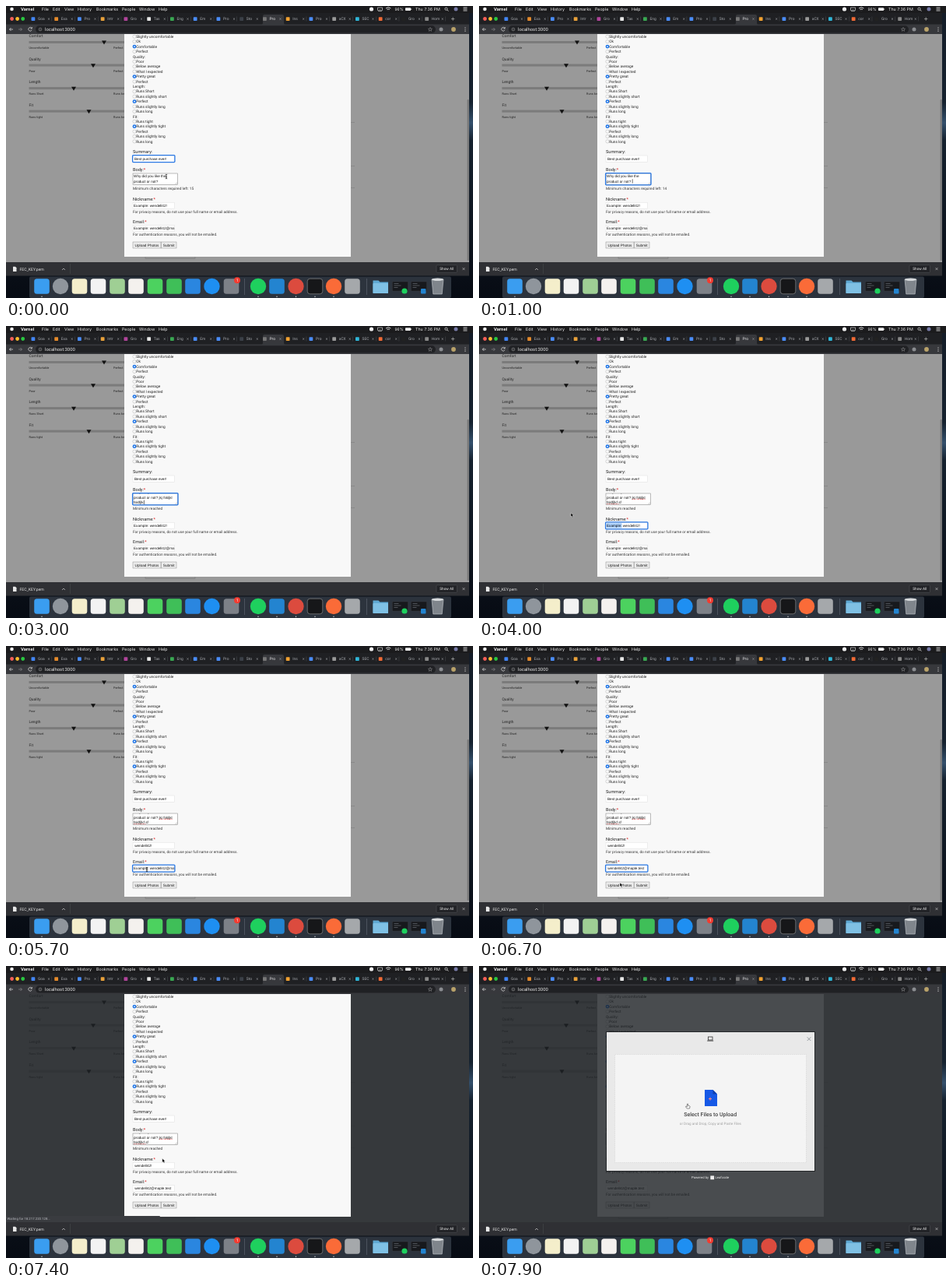
An HTML page for the animation above (8 s loop, 600 by 375 pixels).

```html
<!DOCTYPE html>
<html lang="en">
<head>
<meta charset="utf-8">
<title>Review form</title>
<style>
  html, body { margin: 0; width: 100%; height: 100%; overflow: hidden; background: #0b111b; }
  svg { display: block; width: 600px; height: 375px; }
  text { white-space: pre; text-rendering: geometricPrecision; }
  .ui { font-family: Inter, "Open Sans", sans-serif; }
  .page { font-family: Roboto, sans-serif; }
  .field { font-family: "Liberation Sans", Arial, sans-serif; }
</style>
</head>
<body>
<svg id="stage" viewBox="0 0 600 375" xmlns="http://www.w3.org/2000/svg"></svg>
<script>
const LOOP = 8000, STEP = 100;
const TOP = 36, BOTTOM = 329;  // visible part of the web page
const SHADE = 'rgb(30,34,38)';

// ---- markup helpers; text is placed by its vertical middle ----
const rect = (x, y, w, h, fill, more = '') =>
  `<rect x="${x}" y="${y}" width="${w}" height="${h}" fill="${fill}" ${more}/>`;
const disc = (x, y, r, fill, more = '') =>
  `<circle cx="${x}" cy="${y}" r="${r}" fill="${fill}" ${more}/>`;
const path = (d, stroke, width = .6, more = 'fill="none"') =>
  `<path d="${d}" stroke="${stroke}" stroke-width="${width}" ${more}/>`;
const label = (x, y, size, str, fill = '#222', font = 'page', more = '') =>
  `<text class="${font}" x="${x}" y="${(y + size * .35).toFixed(2)}" font-size="${size}" fill="${fill}" ${more}>${str}</text>`;
const group = (id, body, more = '') => `<g id="${id}" ${more}>${body}</g>`;
const cross = (x, y, r, color, width = .6) =>
  path(`M${x - r} ${y - r}l${2 * r} ${2 * r}m0 ${-2 * r}l${-2 * r} ${2 * r}`, color, width);

function menuBar() {
  const items = [[46, 'File'], [60, 'Edit'], [75, 'View'], [92, 'History'], [116, 'Bookmarks'],
    [149, 'People'], [171, 'Window'], [196, 'Help']];
  return rect(0, 0, 600, 9, '#1b1b1d') + disc(7.5, 4, 2.3, '#eee')
    + label(19, 4, 5.4, 'Varnel', '#fff', 'ui', 'font-weight="700"')
    + items.map(([x, s]) => label(x, 4, 5.3, s, '#f2f2f2', 'ui')).join('')
    + disc(469.5, 4, 2.6, '#f2f2f2')
    + path('M478.500 5.500h-1V2h6v3.500h-1M478.500 6.600l2-2 2 2z', '#eee', .6)
    + path('M488 3q3.200-2.700 6.400 0M489.500 4.600q1.700-1.400 3.400 0M491.200 6.200v.1', '#eee', .9)
    + label(499.5, 4, 5, '96%', '#f2f2f2', 'ui')
    + rect(513, 2.2, 7, 3.8, '#eee', 'rx=".7"') + rect(520.4, 3.2, .7, 1.8, '#eee')
    + label(526, 4, 5.3, 'Thu 7:36 PM', '#f2f2f2', 'ui')
    + disc(565.5, 3.7, 1.6, 'none', 'stroke="#eee" stroke-width=".7"') + path('M566.700 4.900l1.700 1.700', '#eee', .8)
    + disc(578, 4, 2.5, '#777ba8')
    + path('M587.500 2h5M587.500 4h5M587.500 6h5', '#eee', .8);
}

function tabs() {
  const names = 'Goa Exa Pro Intr Gro Tas Eng Em Pro Sto Pro Ins Pro aCX SEC cor Gro Hom'.split(' ');
  const icons = '#4285f4 #e58a2c #4a8cf7 #e7a03a #b0449a #e6e6e6 #39a852 #4a8cf7 #4a8cf7 #3b4048 #777 #f0a030 #4a8cf7 #999 #2fb6d8 #f06a35 #222 #888'.split(' ');
  let s = rect(0, 9, 595, 15, '#1f2023')
    + disc(7.6, 16.5, 2.4, '#f95f57') + disc(14.6, 16.5, 2.4, '#fbbd2e') + disc(21.7, 16.5, 2.4, '#2ac840')
    + path('M328 24q2 0 2-3V13q0-2 2-2h23q2 0 2 2v8q0 3 2 3z', 'none', 0, 'fill="#37383c"');
  names.forEach((name, i) => {
    const x = 41 + i * 29.75;
    s += rect(x - 8.5, 14.2, 4.8, 4.8, icons[i], 'rx=".8"')
      + label(x, 16.6, 4.9, name, i === 10 ? '#eee' : '#a9abb0')
      + cross(x + 14, 16.6, 1.1, '#b4b6ba', .5);
    if (i < 9 || i > 10) s += rect(x + 17.5, 13.5, .4, 6, '#55575b');
  });
  return s + path('M572 16.600h4.400M574.200 14.400v4.400', '#ccc', .6);
}

function toolbar() {
  return rect(0, 23.5, 595, TOP - 23.5, '#37383c')
    + path('M9 30H4.500m2-2l-2 2 2 2', '#e4e4e4', .7)
    + path('M16 30h4.500m-2-2l2 2-2 2', '#88898c', .7)
    + path('M33 28.500a2.300 2.300 0 1 0 .2 2.200M33.300 27v2h-2', '#e4e4e4', .7)
    + rect(38, 25.3, 514, 9.2, '#202124', 'rx="4.600"')
    + disc(44, 30, 1.9, 'none', 'stroke="#aaa" stroke-width=".5"') + path('M44 29.700v1.300M44 28.700v.4', '#aaa', .5)
    + label(50, 29.9, 5.9, 'localhost:3000', '#e8e8e8')
    + path('M545 27.500l.7 1.700 1.800.1-1.400 1.200.5 1.800-1.600-1-1.600 1 .5-1.800-1.400-1.200 1.800-.1z', '#bbb', .4)
    + disc(559, 30, 2.5, '#8b8d91') + disc(575, 30, 2.9, '#b9a26a')
    + [27.8, 30, 32.2].map(y => disc(590, y, .6, '#ddd')).join('');
}

function backPage() {
  const rows = [['Comfort', 'Uncomfortable', 'Perfect', 126], ['Quality', 'Poor', 'Perfect', 112],
    ['Length', 'Runs Short', 'Runs long', 87], ['Fit', 'Runs tight', 'Runs long', 106.5]];
  let s = rect(0, TOP, 595, BOTTOM - TOP, '#999');
  rows.forEach(([title, low, high, x], i) => {
    const y = 46.4 + i * 29.55;
    s += label(29.5, y - 8, 4.9, title) + rect(29.5, y - 1.4, 124, 3, '#7b7b7b')
      + path(`M${x - 3} ${y - 1.8}h6l-3 5z`, 'none', 0, 'fill="#111"')
      + label(29.5, y + 7.6, 3.9, low) + label(138, y + 7.6, 3.9, high);
  });
  return s + [149, 205.5, 233].map(y => rect(442, y, 6, .5, '#777')).join('')
    + rect(179, 315, 64, 9.7, '#949494', 'stroke="#777" stroke-width=".5"');
}

function options() {
  const rows = ['Slightly uncomfortable', 'Ok', '*Comfortable', 'Perfect',
    'Quality:', 'Poor', 'Below average', 'What I expected', '*Pretty great', 'Perfect',
    'Length:', 'Runs Short', 'Runs slightly short', '*Perfect', 'Runs slightly long', 'Runs long',
    'Fit:', 'Runs tight', '*Runs slightly tight', 'Perfect', 'Runs slightly long', 'Runs long'];
  return rows.map((row, i) => {
    const y = 39.3 + i * 6.41;
    if (row.endsWith(':')) return label(163, y, 4.8, row);
    const on = row[0] === '*';
    const dot = on ? disc(165, y, 2.4, '#1a73e8') + disc(165, y, .9, '#fff')
      : disc(165, y, 2.1, '#fff', 'stroke="#999" stroke-width=".4"');
    return dot + label(167.2, y, 4.8, on ? row.slice(1) : row);
  }).join('');
}

const star = '<tspan fill="#e02020">*</tspan>';
const heading = (y, s) => label(163, y, 5.6, s);
const input = (y, id, x, str) => rect(163, y, 53.5, 8.3, '#fff', 'stroke="#ddd" stroke-width=".5"')
  + `<svg x="163" y="${y}" width="53.500" height="8.300" viewBox="163 ${y} 53.500 8.300">`
  + rect(164, y + 1, 0, 6.3, '#a9cffb', `id="${id}Sel"`)
  + label(x, y + 4.2, 4.65, str, '#111', 'field', `id="${id}"`) + '</svg>';
const ring = (id, y, w, h) => rect(162.6, y - .4, w, h, 'none', `id="${id}" rx="1" stroke="#2a78e4" stroke-width="1.300"`);
const button = (x, w, s) => rect(x, 303, w, 8, '#ededed', 'stroke="#777" stroke-width=".4"')
  + label(x + w / 2, 307, 4.7, s, '#111', 'field', 'text-anchor="middle"');
const wave = (x, y, w) => path(`M${x} ${y}h${w}`, '#e03030', .8, 'stroke-dasharray=".9 .6"');
const panel = (fill, more) => rect(152, TOP, 291, 322 - TOP, fill, more);

function form() {
  return panel('#f8f8f8') + options()
    + heading(187.5, 'Summary:') + input(192, 'summary', 165, 'Best purchase ever!')
    + heading(210.5, 'Body:' + star)
    + rect(163, 215, 57.6, 14.4, '#fff', 'stroke="#777" stroke-width=".5"')
    + '<svg x="163" y="215.200" width="57.600" height="14" viewBox="163 215.200 57.600 14">'
    + group('lines', label(164, 218.6, 4.65, 'Why did you like the', '#111', 'field')
      + label(164, 225, 4.65, '', '#111', 'field', 'id="line2"')
      + label(164, 231.4, 4.65, '', '#111', 'field', 'id="line3"')
      + group('waves', wave(197, 227.4, 4.5) + wave(202.5, 227.4, 11) + wave(164, 233.8, 15.5)))
    + '</svg>' + path('M217.500 228.800l2.400-2.400M219 228.800l.9-.9', '#777', .4)
    + label(163, 234.5, 4.78, '', '#333', 'page', 'id="hint"')
    + heading(248, 'Nickname:' + star) + input(252.2, 'nick', 164, '')
    + label(163, 264, 4.78, 'For privacy reasons, do not use your full name or email address.', '#333')
    + heading(277.5, 'Email:' + star) + input(281.5, 'mail', 164, '')
    + label(163, 293.2, 4.78, 'For authentication reasons, you will not be emailed.', '#333')
    + button(163, 36, 'Upload Photos') + button(199.3, 19.7, 'Submit')
    + ring('ringSummary', 192, 54.3, 9) + ring('ringBody', 215, 58.4, 15.2)
    + ring('ringNick', 252.2, 54.3, 9) + ring('ringMail', 281.5, 54.3, 9)
    + rect(0, 0, .6, 5.4, '#111', 'id="caret"');
}

function picker() {
  return rect(163, 84, 269, 180, '#15181b', 'opacity=".7"')
    + rect(164, 85, 267, 178, '#e9e9e9')
    + rect(294.4, 91, 5.6, 4, 'none', 'stroke="#333" stroke-width=".8"') + rect(293.2, 95.6, 8, .9, '#333')
    + cross(424, 93.7, 2.3, '#8d9399', .9)
    + rect(174.5, 113.5, 246, 139, '#f4f4f4', 'stroke="#ccc" stroke-width=".5" stroke-dasharray="1.500 1"')
    + path('M290 159h10.500l5.500 5.500V180h-16z', 'none', 0, 'fill="#1759e6"')
    + path('M300.500 159v5.500h5.500z', 'none', 0, 'fill="#0d3fae"')
    + path('M295 170.600h4M297 168.600v4', '#ff8a80', 1)
    + label(297.2, 190.8, 7, 'Select Files to Upload', '#444', 'page', 'text-anchor="middle" font-weight="500"')
    + label(297.4, 202.7, 4.6, 'or Drag and Drop, Copy and Paste Files', '#a0a0a0', 'page', 'text-anchor="middle"')
    + label(273, 272, 4.25, 'Powered by', '#f0f0f0') + rect(297.3, 269.4, 4.8, 4.8, '#eee')
    + label(303.5, 272, 4.25, 'Leafcrate', '#f0f0f0');
}

function downloads() {
  return rect(0, BOTTOM, 595, 17.5, '#2f3034')
    + path('M9 334.700h3l1.500 1.500v4.800H9z', 'none', 0, 'fill="#e8e8e8"')
    + label(17.5, 338, 5.1, 'FEC_KEY.pem', '#e6e6e6')
    + path('M72 339l2-2 2 2', '#ccc', .7) + rect(82, 331, .4, 13, '#55565a')
    + rect(553, 332.8, 26.5, 9.6, '#222327', 'rx="1" stroke="#55565a" stroke-width=".5"')
    + label(566.3, 337.6, 4.7, 'Show All', '#f0f0f0', 'page', 'text-anchor="middle"')
    + cross(588, 337.6, 1.5, '#ccc', .6);
}

function dock() {
  const apps = [[46, '#3a9df0'], [70, '#8f959c', 1], [94.5, '#f4eecb'], [118.5, '#f3f3f3'], [143, '#9fcf94'],
    [167, '#f4f1ee'], [191.5, '#4cd25f'], [216, '#3fbf58'], [240, '#2a86e0'], [264.5, '#1e8ff2', 1], [289.5, '#7d8188'],
    [324, '#1ed05e', 1], [348, '#2384d0'], [372.5, '#dc4b3e', 1], [397, '#161719'], [421, '#fa6b38', 1], [445, '#a5a8ab']];
  const thumb = x => rect(x - 10, 354, 20, 12, '#17191d', 'stroke="#444" stroke-width=".3"')
    + path(`M${x - 8} 356.500h6m-6 2.500h9m-9 2.500h5`, '#777b82', .6);
  return rect(30, 347.5, 542, 27.5, '#2c333d', 'rx="2"')
    + apps.map(([x, c, round]) => round ? disc(x, 360, 10.2, c)
      : rect(x - 9.8, 350.2, 19.6, 19.6, c, 'rx="3.500"' + (x === 397 ? ' stroke="#999" stroke-width=".6"' : ''))).join('')
    + disc(297, 352.3, 4, '#f33b30') + label(297, 352.3, 5, '1', '#fff', 'ui', 'text-anchor="middle"')
    + [306.5, 463].map(x => rect(x, 350, .5, 21, '#6c7480')).join('')
    + path('M471.500 352.500h7l2 2h10.500v14.500h-19.500z', 'none', 0, 'fill="#5fa9d3"') + rect(471.5, 356, 19.5, 13, '#7fc0e4', 'rx="1"')
    + thumb(506.5) + disc(512, 366, 3.6, '#1ed05e') + thumb(530.5) + rect(533, 363, 6.5, 6.5, '#2384d0', 'rx="1"')
    + path('M547 351h15l-1.800 19h-11.400z', '#c8ccd0', .6, 'fill="#9ba1a7" fill-opacity=".75"')
    + `<ellipse cx="554.5" cy="351.2" rx="7.500" ry="1.800" fill="#d5d8db"/>`
    + [46, 324, 348, 372.5, 397, 421].map(x => disc(x, 373.2, .7, '#ddd')).join('');
}

const cursors = group('arrow', path('M0 0v5l1.200-1 .9 1.900 1-.5-.9-1.800h1.600z', '#fff', .4, 'fill="#000"'))
  + group('beam', path('M-1.200-2.800q1.200 0 1.200.8 0-.8 1.200-.8M0-2v4M-1.200 2.800q1.200 0 1.200-.8 0 .8 1.200.8M-.8.7h1.600', '#111', .7))
  + group('hand', path('M-.6-2.800q.6-.6 1.200 0v2l2 .6q.6.300.4 1.200l-.5 2h-3.300l-1.700-2.200q0-1 .9-.6l1 .7z', '#222', .5, 'fill="#fff"'));

const sky = `<defs><linearGradient id="sky" x2="0" y2="1"><stop stop-color="#141c28"/>
  <stop offset=".33" stop-color="#16222f"/><stop offset=".4" stop-color="#34506c"/>
  <stop offset=".46" stop-color="#16222f"/><stop offset="1" stop-color="#070b13"/></linearGradient></defs>`
  + rect(0, 0, 600, 375, 'url(#sky)');

document.getElementById('stage').innerHTML = sky + backPage()
  + rect(0, TOP, 595, BOTTOM - TOP, SHADE, 'id="shade"') + form()
  + panel(SHADE, 'id="formShade"')
  + rect(592.6, 120, 2.2, 207, '#777', 'id="scroll" rx="1.100"')
  + group('status', rect(0, 321, 198, BOTTOM - 321, '#3a3c40', 'rx="1"')
    + label(1.5, 324.9, 4.3, 'Waiting for 18.217.220.128...', '#b9bbbf'))
  + group('picker', picker())
  + menuBar() + tabs() + toolbar() + downloads() + dock() + cursors;

// ---- motion ----
const el = id => document.getElementById(id);
const show = (id, on) => el(id).setAttribute('visibility', on ? 'visible' : 'hidden');
const set = (id, name, value) => el(id).setAttribute(name, value);
const ramp = (t, a, b) => Math.max(0, Math.min(1, (t - a) / (b - a)));

const TYPED = ' jkj fskljkl fsklfjlkf sf', WRAP = 12;
const NICK = 'wendell42!', MAIL = 'wendell42@maple.test';
const mouse = [[0, 206, 219], [3100, 206, 219], [3400, 183.5, 257], [3900, 118, 240], [4500, 118, 240],
  [5200, 183, 287], [5500, 181, 287], [5700, 181, 287], [6000, 159, 287], [6200, 159, 287],
  [6600, 181, 304], [6900, 181, 304], [7300, 193, 255], [7800, 268, 180], [8000, 268, 180]];

function mouseAt(t) {
  const i = mouse.findIndex((m, k) => k && t <= m[0]);
  const [a, b] = [mouse[i - 1], mouse[i]];
  const k = ramp(t, a[0], b[0]), e = k * k * (3 - 2 * k);
  return [a[1] + (b[1] - a[1]) * e, a[2] + (b[2] - a[2]) * e];
}

function fill(id, text, cut) {
  el(id).textContent = cut ? text : 'Example: ' + text;
  set(id, 'x', cut ? 165.2 : 164);
}

function select(id, on, x) {
  const left = Math.max(164, Math.min(183.5, x));
  set(id, 'x', left);
  set(id, 'width', on ? 183.5 - left : 0);
}

function draw(t) {
  const [mx, my] = mouseAt(t);
  const count = Math.max(0, Math.min(TYPED.length, Math.floor((t - 900) / 100)));
  const scrolled = count > WRAP;
  el('line2').textContent = 'product or not?' + TYPED.slice(0, Math.min(count, WRAP));
  el('line3').textContent = TYPED.slice(WRAP + 1, count);
  set('lines', 'transform', `translate(0 ${scrolled ? -5 : 0})`);
  show('waves', t >= 3400);
  el('hint').textContent = count < 15 ? 'Minimum characters required left: ' + (15 - count) : 'Minimum reached';

  const focus = t < 300 ? 'Summary' : t < 3400 ? 'Body' : t < 5300 ? 'Nick' : t < 6900 ? 'Mail' : '';
  for (const name of ['Summary', 'Body', 'Nick', 'Mail']) show('ring' + name, name === focus);
  fill('nick', NICK, t >= 4400);
  fill('mail', MAIL, t >= 6200);
  select('nickSel', t >= 3400 && t < 4400, mx);
  select('mailSel', t > 5700 && t < 6200, mx);

  let caret = null;
  if (focus === 'Body') {
    const line = el(scrolled ? 'line3' : 'line2');
    const typing = count > 0 && count < TYPED.length;
    const width = line.textContent ? line.getComputedTextLength() : 0;
    if (typing || t % 1000 < 500) caret = [164.3 + width, scrolled ? 223.6 : 222.3];
  } else if (focus === 'Nick' && t >= 4400 && t % 1000 < 500) caret = [164, 253.8];
  show('caret', caret);
  if (caret) { set('caret', 'x', caret[0]); set('caret', 'y', caret[1]); }

  const busy = t >= 900 && t < 3100;
  const kind = t < 3900 || (t >= 5200 && t < 6300) ? 'beam' : t < 7700 ? 'arrow' : 'hand';
  for (const id of ['arrow', 'beam', 'hand']) {
    show(id, id === kind && !busy);
    set(id, 'transform', `translate(${mx} ${my})`);
  }

  set('shade', 'opacity', t >= 7000 ? .8 : 0);
  set('formShade', 'opacity', t >= 7500 ? .8 : 0);
  show('scroll', t < 7000);
  show('status', t >= 7000 && t < 7500);
  set('picker', 'opacity', ramp(t, 7400, 7600));
}

function tick(now) {
  draw(Math.floor((now % LOOP) / STEP) * STEP);
  requestAnimationFrame(tick);
}
draw(0);
requestAnimationFrame(tick);
</script>
</body>
</html>
```
